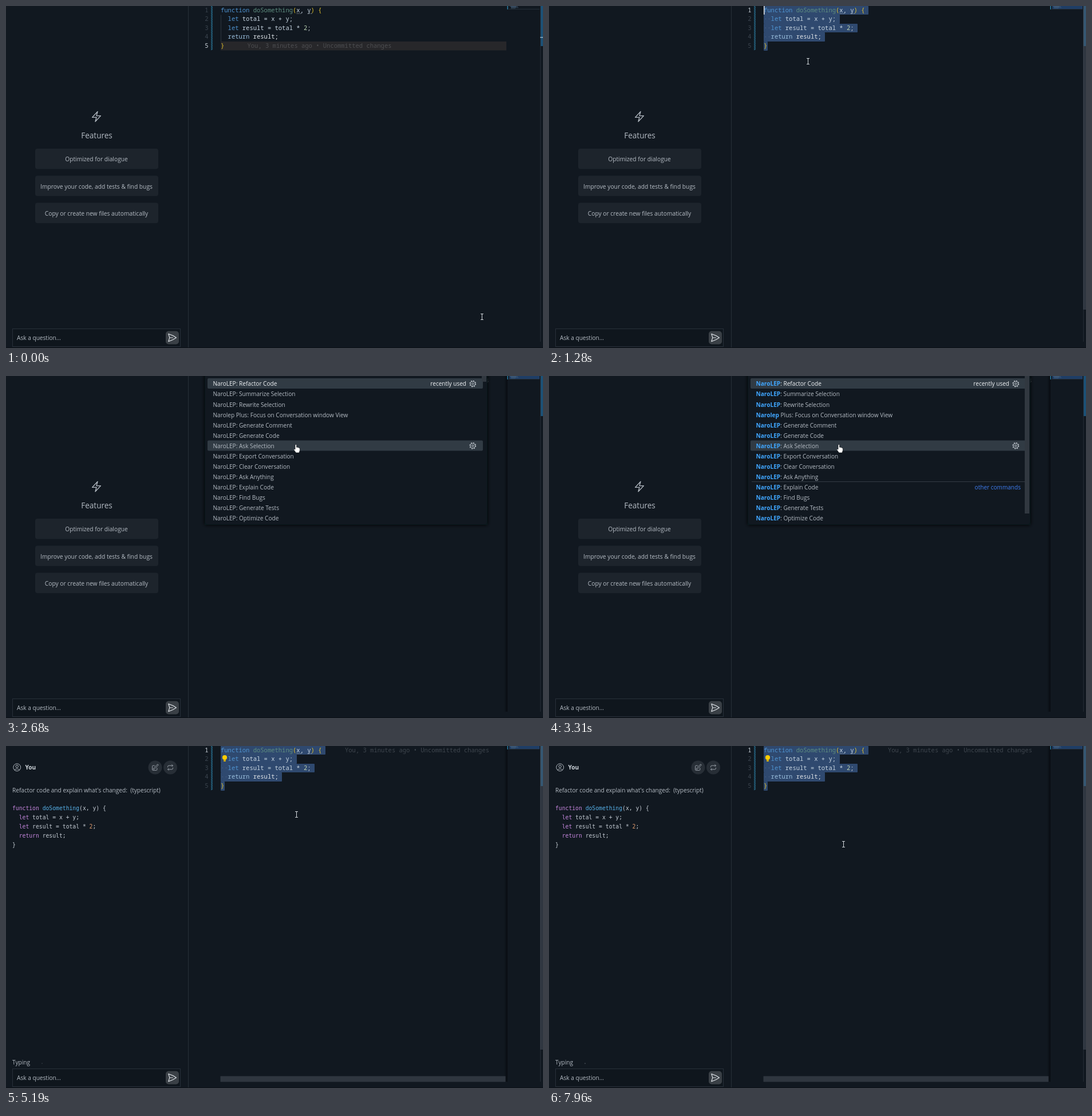
These frames come from a looping animation (938 by 597 pixels, 8000 ms). An HTML page:

```html
<!DOCTYPE html>
<html lang="en">
<head>
<meta charset="utf-8">
<title>Refactor code</title>
<style>
  html, body { margin: 0; width: 100%; height: 100%; overflow: hidden; background: #111820; }
  svg { display: block; position: absolute; left: 0; top: 0; }
  text { white-space: pre; font-family: "Open Sans", "Noto Sans", sans-serif; font-size: 10.15px; fill: #b4bbc3; }
  .mono { font-family: "Noto Sans Mono", "DejaVu Sans Mono", monospace; font-size: 10.5px; }
  .chat { font-family: "DejaVu Sans Mono", "Noto Sans Mono", monospace; font-size: 9.73px; }
  .line { fill: none; stroke-linecap: round; stroke-linejoin: round; }
</style>
</head>
<body>
<svg id="stage" width="938" height="597" viewBox="0 0 938 597">
  <defs>
    <pattern id="stripes" width="3" height="3" patternUnits="userSpaceOnUse">
      <path d="M-1 1L1 -1M0 3L3 0M2 4L4 2" stroke="#2b7da3" stroke-width="1.1"/>
    </pattern>
    <linearGradient id="edge"><stop offset="0" stop-color="#080c11" stop-opacity="0"/><stop offset="1" stop-color="#080c11"/></linearGradient>
    <filter id="shadow" x="-10%" y="-10%" width="120%" height="120%"><feGaussianBlur stdDeviation="3"/></filter>
  </defs>
</svg>
<script>
const LOOP = 8000;
const stage = document.getElementById('stage');

function el(parent, tag, attrs, content) {
  const node = document.createElementNS('http://www.w3.org/2000/svg', tag);
  for (const k in attrs) node.setAttribute(k, attrs[k]);
  if (content !== undefined) node.textContent = content;
  parent.appendChild(node);
  return node;
}
const group = (parent, attrs = {}) => el(parent, 'g', attrs);
const rect = (parent, x, y, width, height, fill, rx = 0) => el(parent, 'rect', { x, y, width, height, fill, rx });
const path = (parent, d, stroke, width = 1, extra = {}) =>
  el(parent, 'path', { d, stroke, 'stroke-width': width, class: 'line', ...extra });
const label = (parent, x, y, text, style = '', anchor = 'start') =>
  el(parent, 'text', { x, y, style, 'text-anchor': anchor }, text);

function tokens(parent, cls, x, y, list) {
  const node = el(parent, 'text', { x, y, class: cls });
  for (const [text, fill] of list) el(node, 'tspan', { style: `fill:${fill}` }, text);
}

// ---- welcome pane
const BOLT = 'M3.75 13.5l10.5-11.25L12 10.5h8.25L9.75 21.75 12 13.5H3.75z';
const PLANE = 'M6 12L3.27 3.13A59.8 59.8 0 0121.5 12 59.8 59.8 0 013.27 20.88L6 12zm0 0h7.5';
const PENCIL = 'M16.9 4.5l1.7-1.7a1.87 1.87 0 112.6 2.65L10.6 16a4.5 4.5 0 01-1.9 1.2L6 18l.8-2.7a4.5 4.5 0 011.1-1.9zM18 14v4.75A2.25 2.25 0 0115.75 21H5.25A2.25 2.25 0 013 18.75V8.25A2.25 2.25 0 015.25 6H10';
const REPEAT = 'M4 11V9a3 3 0 013-3h13M17 3l3 3-3 3M20 13v2a3 3 0 01-3 3H4M7 21l-3-3 3-3';

const welcome = group(stage);
path(welcome, BOLT, '#b4bbc3', 1.5, { transform: 'translate(147.2 182.2) scale(.9)' });
label(welcome, 158.5, 231, 'Features', 'font-size:13.6px', 'middle');
[['Optimized for dialogue', 249], ['Improve your code, add tests & find bugs', 296.3], ['Copy or create new files automatically', 343.6]]
  .forEach(([text, y]) => {
    rect(welcome, 51, y, 215, 35.5, '#1d242c', 4);
    label(welcome, 158, y + 22.2, text, 'font-size:10.25px', 'middle');
  });

// ---- conversation pane
const chat = group(stage);
el(chat, 'circle', { cx: 19.2, cy: 37.3, r: 6.4, fill: 'none', stroke: '#b4bbc3' });
el(chat, 'circle', { cx: 19.2, cy: 35.6, r: 2.2, fill: 'none', stroke: '#b4bbc3' });
path(chat, 'M15 41.6Q19.2 37.8 23.4 41.6', '#b4bbc3');
label(chat, 33.5, 41.2, 'You', 'font-weight:700;fill:#d0d6dc');
[[260.5, PENCIL], [287, REPEAT]].forEach(([x, d]) => {
  el(chat, 'circle', { cx: x, cy: 37.5, r: 12, fill: '#272e36' });
  path(chat, d, '#9fa7af', 1.7, { transform: `translate(${x - 6.6} 30.9) scale(.55)` });
});
label(chat, 11, 80.7, "Refactor code and explain what's changed:  (typescript)");
const P = '#c586dd', W = '#c3cad2', F = '#56b0e8', N = '#dc9a6c';
[
  [['function ', P], ['doSomething', F], ['(x, y) {', W]],
  [['  let', P], [' total = x + y;', W]],
  [['  let', P], [' result = total * ', W], ['2', N], [';', W]],
  [['  return', P], [' result;', W]],
  [['}', W]]
].forEach((row, i) => tokens(chat, 'chat', 11, 112.2 + i * 16, row));
label(chat, 11, 556, 'Typing');
const dots = [51, 57, 63].map(cx => el(chat, 'circle', { cx, cy: 554, r: 0, fill: '#b4bbc3' }));

// ---- question box
const ask = rect(stage, 11.5, 563.5, 293, 31, '#0f161d');
ask.setAttribute('stroke', '#28303a');
label(stage, 19, 583.2, 'Ask a question...');
rect(stage, 279, 567.5, 23, 23, '#3a4046', 5);
path(stage, PLANE, '#d5dadf', 1.6, { transform: 'translate(281.3 570) scale(.75)' });
rect(stage, 318, 0, 1, 597, '#272f38');
rect(stage, 0, 596, 938, 1, '#0c1117');

// ---- editor
const ROW = 15.6, PITCH = 6.3, LEFT = 375;
const rowRect = rect(stage, LEFT, 62, 499, 15.5, '#27272a');
const guide = rect(stage, 375, 15.5, 1, 46.5, '#2c353f');
const selection = [183, 133, 164, 107, 7].map((w, i) => {
  const g = group(stage), y = Math.round(i * ROW - .4);
  rect(g, LEFT, y, w, Math.round((i + 1) * ROW - .4) - y, '#2f496f', 1);
  if (i > 0 && i < 4) [0, 1].forEach(c =>
    el(g, 'circle', { cx: LEFT + PITCH * (c + .5), cy: i * ROW + 7, r: .6, fill: '#5d7291' }));
  return g;
});
const brackets = group(stage);
[[545.5, .5], [375.5, 62.5]].forEach(([x, y]) =>
  rect(brackets, x, y, 6, 14, '#39586b').setAttribute('stroke', '#7d8b91'));

const K = '#4f94d2', V = '#c8d6e2', G = '#e5c42c', O = '#c3cad2';
[
  [['function ', K], ['doSomething', '#5f8f80'], ['(', G], ['x, y', V], [')', G], [' {', G]],
  [['  let', K], [' total = x + y;', V]],
  [['  let', K], [' result = total * ', V], ['2', '#b9cfb0'], [';', O]],
  [['  return', '#9cc0de'], [' result;', '#e0e4e8']],
  [['}', G]]
].forEach((row, i) => tokens(stage, 'mono', LEFT, 10.5 + i * ROW, row));
[508, 527].forEach(x => [0, 3, 6].forEach(d => rect(stage, x + d, 12.5, 1.3, 1.3, '#9aa3ab')));
const numbers = [1, 2, 3, 4, 5].map((n, i) => {
  const node = label(stage, 353.5, 10.5 + i * ROW, n, '', 'end');
  node.setAttribute('class', 'mono');
  return node;
});
rect(stage, 358, 0, 3, 77, 'url(#stripes)');
const blame = label(stage, 0, 0, 'You, 3 minutes ago • Uncommitted changes');
blame.setAttribute('class', 'mono');
const caret = rect(stage, 375, 0, 1.5, 15, '#e6eaee');
const bulb = group(stage);
el(bulb, 'circle', { cx: 382, cy: 20, r: 4.1, fill: '#ffcc00' });
rect(bulb, 380, 22.5, 4, 4.5, '#ffcc00', 1);
rect(bulb, 380, 24.6, 4, .8, '#6b5a10');

// ---- minimap and scrollbars
const edge = rect(stage, 870, 0, 6, 586, 'url(#edge)');
const mapSel = rect(stage, 879, 0, 53, 5, '#1f3e66');
rect(stage, 875.5, 0, 1.5, 6, '#2b7da3');
rect(stage, 878, 5, 54, 1, '#26303a');
[[880, 14], [882, 9], [882, 13], [882, 8]].forEach(([x, w], i) => rect(stage, x, i * 1.2, w, .7, '#48627c'));
const hBar = rect(stage, 374.5, 576.3, 498, 10, '#2f363f');
rect(stage, 933, 0, 1, 586, '#242c35');
rect(stage, 934, 0, 4, 70, '#1c5176');
const vBar = rect(stage, 933, 0, 5, 530, '#59616b');
vBar.setAttribute('fill-opacity', .42);
const tick = rect(stage, 933, 54, 5, 1.5, '#8fb0c4');

// ---- command palette
const palette = group(stage);
rect(palette, 347, -10, 494, 270, '#05080c').setAttribute('filter', 'url(#shadow)');
rect(palette, 348, -4, 492, 263, '#111820', 4);
rect(palette, 352, 4, 481, 18, '#313b44', 2);
const hoverRow = rect(palette, 352, 112.6, 481, 18, '#313b44', 2);
const thumb = rect(palette, 831, 0, 8, 240, '#313840');
const COMMANDS = ['NaroLEP: Refactor Code', 'NaroLEP: Summarize Selection', 'NaroLEP: Rewrite Selection',
  'Narolep Plus: Focus on Conversation window View', 'NaroLEP: Generate Comment', 'NaroLEP: Generate Code',
  'NaroLEP: Ask Selection', 'NaroLEP: Export Conversation', 'NaroLEP: Clear Conversation',
  'NaroLEP: Ask Anything', 'NaroLEP: Explain Code', 'NaroLEP: Find Bugs',
  'NaroLEP: Generate Tests', 'NaroLEP: Optimize Code'];
const MATCH = 7; // letters highlighted by the filter
const prefixes = COMMANDS.map((name, i) => {
  const row = label(palette, 361.5, 17.4 + i * 18.08, '', `font-size:10.1px;fill:${i ? '#b4bbc3' : '#eef1f4'}`);
  const prefix = el(row, 'tspan', {}, name.slice(0, MATCH));
  el(row, 'tspan', {}, name.slice(MATCH));
  return prefix;
});
label(palette, 804, 17.4, 'recently used', 'fill:#eef1f4;font-size:10.05px', 'end');
function gear(parent, cy) {
  const g = group(parent, { transform: `translate(815.3 ${cy})`, fill: 'none', stroke: '#c0c7ce' });
  el(g, 'circle', { r: 4.2 });
  el(g, 'circle', { r: 1.6 });
  el(g, 'circle', { r: 5.2, 'stroke-width': 1.4, 'stroke-dasharray': '2 2.08' });
}
gear(palette, 13.5);
const hoverGear = group(palette);
gear(hoverGear, 121.8);
const others = group(palette);
rect(others, 354, 184, 477, 1, '#343c45');
label(others, 824, 198.2, 'other commands', 'fill:#3f7df0;font-size:10.05px', 'end');

// ---- pointers
const beam = path(stage, 'M-2 -5H2M0 -5V5M-2 5H2', '#d5dade', 1);
const arrow = el(stage, 'path', { d: 'M0 0V13L3 10.2L5 14.5L7 13.6L5 9.4H9Z', fill: '#fff', stroke: '#111', 'stroke-width': .7 });
const hand = el(stage, 'path', {
  d: 'M505 120.5Q506.3 118.3 507.6 120.5V124.5Q508.8 123.4 509.7 124.9Q511 124 511.7 125.5Q513.4 125 513.4 127V130L512 134H506.5L502.7 128.7Q502.6 126.6 505 128Z',
  fill: '#fff', stroke: '#0b0f14', 'stroke-width': .7
});

// ---- timeline
const MOUSE = [[0, 831, 542], [60, 831, 542], [180, 690, 390], [300, 470, 150], [400, 386, 72], [460, 382, 69],
  [560, 378, 34], [640, 374, -20], [940, 318, -18], [1040, 340, 16], [1200, 420, 82], [1400, 500, 117],
  [1510, 507, 119], [7780, 507, 119], [7960, 514, 171], [8000, 514, 171]];
const BAR_V = [[0, 0], [70, 0], [250, 1], [2290, 1], [2400, 0], [4310, 0], [4480, 1], [8000, 1]];
const BAR_H = [[0, 0], [1400, 0], [1510, 1], [2290, 1], [2400, 0], [4310, 0], [4480, 1], [8000, 1]];
const CARET = [[460, 700], [1170, 1665], [2130, 2195], [4325, 4830], [5330, 5830], [6330, 6785], [7290, 7785]];

function sample(keys, t) {
  let i = 1;
  while (i < keys.length - 1 && keys[i][0] <= t) i++;
  const a = keys[i - 1], b = keys[i], k = Math.min(1, (t - a[0]) / (b[0] - a[0]));
  return a.slice(1).map((v, j) => v + (b[j + 1] - v) * k);
}
const within = (t, a, b) => t >= a && t < b;
const show = (node, on) => node.setAttribute('visibility', on ? 'visible' : 'hidden');
const ease = k => k * k * (3 - 2 * k);

function pulse(t, i) {
  const p = ((t - 5350 - i * 160) % 1400 + 2800) % 1400;
  return ease(Math.max(0, 1 - Math.abs(p - 560) / 560));
}

function render(t) {
  const talking = t >= 4325, open = within(t, 2285, 4325), filtered = t >= 3305;
  show(welcome, !talking);
  show(chat, talking);
  if (talking) dots.forEach((d, i) => d.setAttribute('r', 1.5 * pulse(t, i)));

  // Selection grows upward from the last line.
  const top = t < 480 ? 5 : t < 520 ? 3 : t < 560 ? 2 : t < 620 ? 1 : 0;
  selection.forEach((g, i) => show(g, i >= top));
  const active = Math.min(top, 4), marked = top < 5;
  numbers.forEach((n, i) => n.style.fill = i === active ? '#cdd4db' : '#3b444e');
  show(rowRect, !marked);
  show(guide, !marked);
  show(tick, !marked);
  show(mapSel, marked);
  show(brackets, within(t, 620, 1200));

  const late = t >= 1400;
  show(blame, !marked || late);
  blame.setAttribute('x', late ? 592 : 421.5);
  blame.setAttribute('y', late ? 10.5 : 72.9);
  blame.style.fill = late ? '#3f464e' : '#4d4e51';
  show(bulb, t >= 1300);
  show(edge, late);
  show(caret, CARET.some(([a, b]) => within(t, a, b)));
  caret.setAttribute('y', active * ROW);
  vBar.setAttribute('opacity', sample(BAR_V, t)[0]);
  hBar.setAttribute('opacity', sample(BAR_H, t)[0]);

  show(palette, open);
  for (const node of [others, hoverRow, hoverGear]) {
    node.setAttribute('display', (node === others ? filtered : t >= 2375) ? 'inline' : 'none');
  }
  thumb.setAttribute('height', filtered ? 240 : 10);
  prefixes.forEach(p => {
    p.style.fontWeight = filtered ? 700 : 400;
    p.style.fill = filtered ? '#40a6ff' : 'inherit';
  });

  const pointing = within(t, 2195, 4325), [x, y] = sample(MOUSE, t).map(v => Math.round(v) + .5), gutter = x < 362;
  show(hand, pointing);
  show(beam, !pointing && !gutter);
  show(arrow, !pointing && gutter);
  for (const node of [beam, arrow]) node.setAttribute('transform', `translate(${x} ${y})`);
}

const start = performance.now();
function frame() {
  render((performance.now() - start) % LOOP);
  requestAnimationFrame(frame);
}
frame();
</script>
</body>
</html>
```
